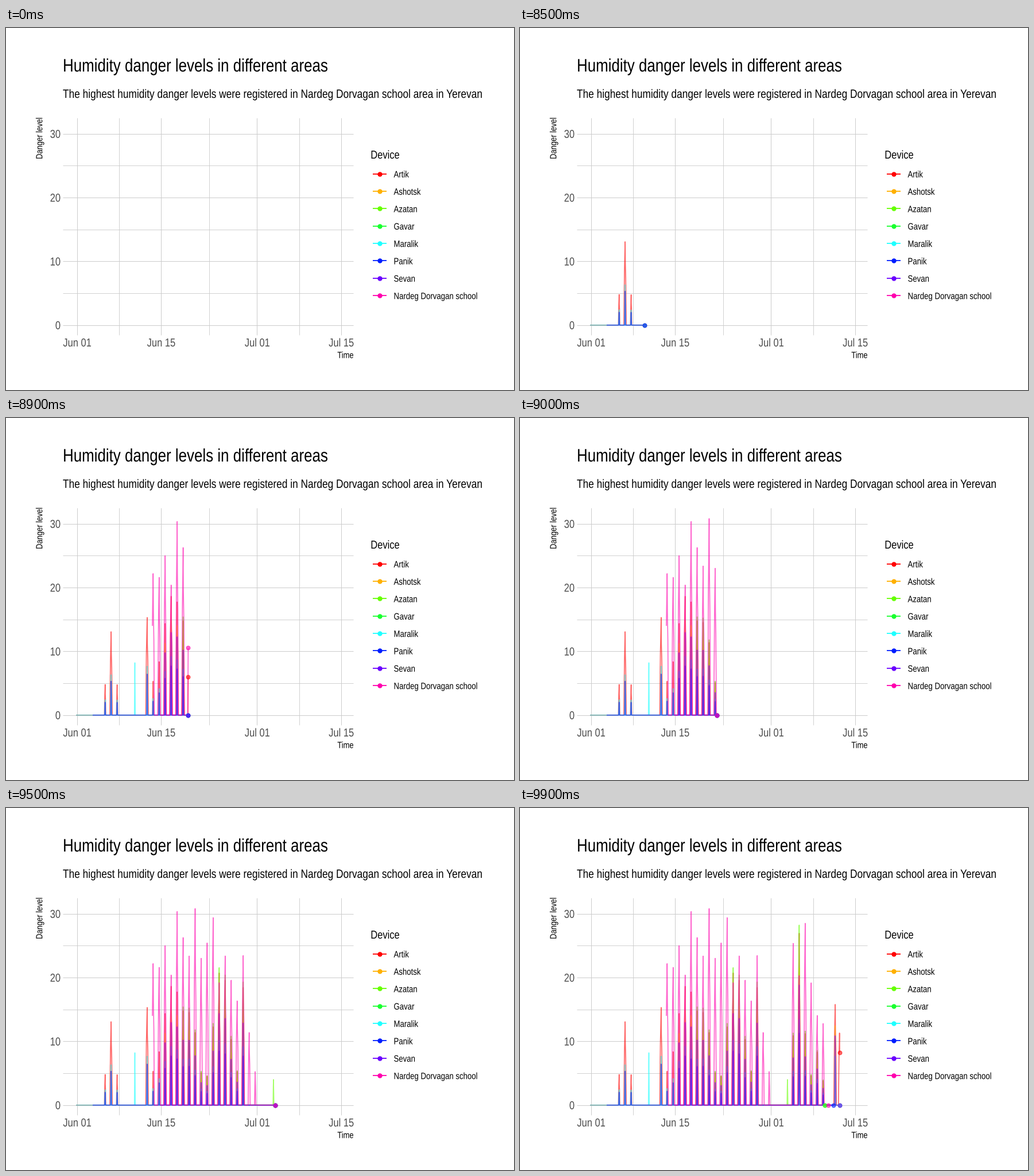
Write a matplotlib script that moves like this. It is 885x632 px and loops after 10 s.

```python
import numpy as np
import matplotlib.pyplot as plt
from matplotlib.animation import FuncAnimation
from matplotlib.colors import to_rgba
from matplotlib.patches import PathPatch
from matplotlib.textpath import TextPath
from matplotlib.transforms import Affine2D

W, H, DPI = 885, 632, 100
PX = 72 / DPI
NARROW = 0.82                      # condensed cut of the sans face
FRAMES, INTERVAL, FIRST = 100, 100, 82
LEFT, RIGHT, TOP, BOTTOM = 99, 605, 157, 536
JUN1, DAY = 123.7, 10.457          # x of 1 June, pixels per day
ZERO, UNIT = 518.7, 11.135         # y of level 0, pixels per level
PEAK0 = 245.9                      # x of the daily peak on day 0
HEAD0, STEP = 141, 25.2            # reveal position and speed
SCHOOL = "Nardeg Dorvagan school"

fig = plt.figure(figsize=(W / DPI, H / DPI), dpi=DPI, facecolor="white")
ax = fig.add_axes([0, 0, 1, 1])
ax.set_xlim(0, W)
ax.set_ylim(H, 0)
ax.axis("off")


def label(x, y, s, size, color="black", align=0.0, angle=0):
    path = TextPath((0, 0), s, size=size, prop={"family": "Liberation Sans"})
    shift = -align * path.get_extents().x1
    place = (Affine2D().translate(shift, 0).scale(NARROW, -1)
             .rotate_deg(-angle).translate(x, y))
    ax.add_patch(PathPatch(path.transformed(place), fc=color, lw=0, zorder=5))


def grid(positions, width, vertical):
    for p in positions:
        xs, ys = ([p, p], [TOP, BOTTOM]) if vertical else ([LEFT, RIGHT], [p, p])
        ax.plot(xs, ys, color="#cccccc", lw=width * PX, zorder=1,
                solid_capstyle="butt")


def level(v):
    return ZERO - UNIT * np.asarray(v)


# Humid spells shared by all towns: middle day, strength, spread in days
SPELLS = [(-6, 13.3, 0.7), (0, 14.2, 0.5), (4.3, 19, 1.8), (7.6, 10, 1),
          (12.4, 22, 1.3), (16, 18, 0.5), (23, 27, 0.75), (26, 8.5, 0.8),
          (29, 16, 0.4)]


def town(day):
    h = sum(a * np.exp(-((day - c) / s) ** 2 / 2) for c, a, s in SPELLS)
    return h if h > 2.5 else 0


def school(day):
    """Broad envelope with a ripple of 2.7 days."""
    keys = [(1, 26.5), (2, 21), (5, 27), (11, 26), (14, 19), (16, 20),
            (18, 5.6), (19, 0), (21, 0), (22, 24), (24, 25), (27, 11)]
    ripple = np.cos(2 * np.pi * (day - 8) / 2.7)
    return np.interp(day, *zip(*keys), left=0, right=0) * (1 + 0.18 * ripple)


class Device:
    def __init__(self, name, color, start, end, share, rule=town, wide=0.6,
                 lone=()):
        self.name, self.color = name, color
        self.x = np.arange(start, end + 0.05, 0.1)
        self.v = np.zeros_like(self.x)
        peaks = [(PEAK0 + DAY * d, share * rule(d)) for d in range(-8, 30)]
        for x, h in peaks + list(lone):
            w = wide * np.clip(h / 15, 0.5, 1)
            dx = np.array([-2.4, -1.7, -1.3, 0, 0.3, 1.2, 2]) * w
            shape = np.array([0, 0.45, 0.65, 1, 0.75, 0.55, 0])
            self.v = np.maximum(self.v, np.interp(self.x, x + dx, h * shape))

    def build(self, order):
        c = to_rgba(self.color, 0.6)
        self.line, = ax.plot([], [], color=c, lw=1.7 * PX, zorder=2 + order / 10,
                             solid_capstyle="butt", solid_joinstyle="round")
        self.dot, = ax.plot([], [], "o", ms=6.8 * PX, mfc=c, mec=c,
                            mew=1.2 * PX, zorder=3 + order / 10)

    def reveal(self, head):
        if head < self.x[0]:
            self.line.set_data([], [])
            self.dot.set_data([], [])
            return
        head = min(head, self.x[-1])
        tip = np.interp(head, self.x, self.v)
        seen = self.x < head
        self.line.set_data(np.append(self.x[seen], head),
                           level(np.append(self.v[seen], tip)))
        self.dot.set_data([head], [level(tip)])


devices = [
    Device("Artik", "#ff0000", 122, 557, 1, wide=1, lone=[(556.65, 11.5)]),
    Device("Ashotsk", "#ffb000", 275, 557, 0.8),
    Device("Azatan", "#66ff00", 305, 530.5, 1.05, lone=[(466, 4)]),
    Device("Gavar", "#1aff2f", 400, 530.5, 0.5),
    Device("Maralik", "#1effff", 122, 557, 0.5, lone=[(224.5, 8.2)]),
    Device("Panik", "#001eff", 151, 546.5, 0.42),
    Device("Sevan", "#6a00ff", 270, 557, 0.7),
    Device(SCHOOL, "#ff00ae", 255, 537, 1, school, wide=1),
]

grid([JUN1 + DAY * d for d in (7, 22, 37)], 0.9, True)
grid(level([5, 15, 25]), 0.9, False)
grid([JUN1 + DAY * d for d in (0, 14, 30, 44)], 1, True)
grid(level([0, 10, 20, 30]), 1, False)

label(99, 76, "Humidity danger levels in different areas", 31.6)
label(99, 122, "The highest humidity danger levels were registered in "
      f"{SCHOOL} area in Yerevan", 21.1)
for v in (0, 10, 20, 30):
    label(94.4, level(v) + 7.2, str(v), 20.1, "#4d4d4d", 1)
for d, s in ((0, "Jun 01"), (14, "Jun 15"), (30, "Jul 01"), (44, "Jul 15")):
    label(JUN1 + DAY * d, 556, s, 20.1, "#4d4d4d", 0.5)
label(RIGHT, 576.3, "Time", 15.8, align=1)
label(63.3, TOP, "Danger level", 15.8, align=1, angle=90)

label(635.3, 228, "Device", 20.1)
for i, dev in enumerate(devices):
    y = 254.5 + 30.35 * i
    ax.plot([638.5, 663], [y, y], color=dev.color, lw=1.8 * PX,
            solid_capstyle="butt")
    ax.plot([650.8], [y], "o", ms=8.4 * PX, color=dev.color, mew=0)
    label(675.5, y + 6.3, dev.name, 16.1)
    dev.build(i)


def draw(k):
    head = HEAD0 + STEP * (k - FIRST) if k >= FIRST else 0
    for dev in devices:
        dev.reveal(head)
    return []


anim = FuncAnimation(fig, draw, frames=FRAMES, interval=INTERVAL,
                     repeat=True, repeat_delay=0, blit=False)
plt.show()
```
